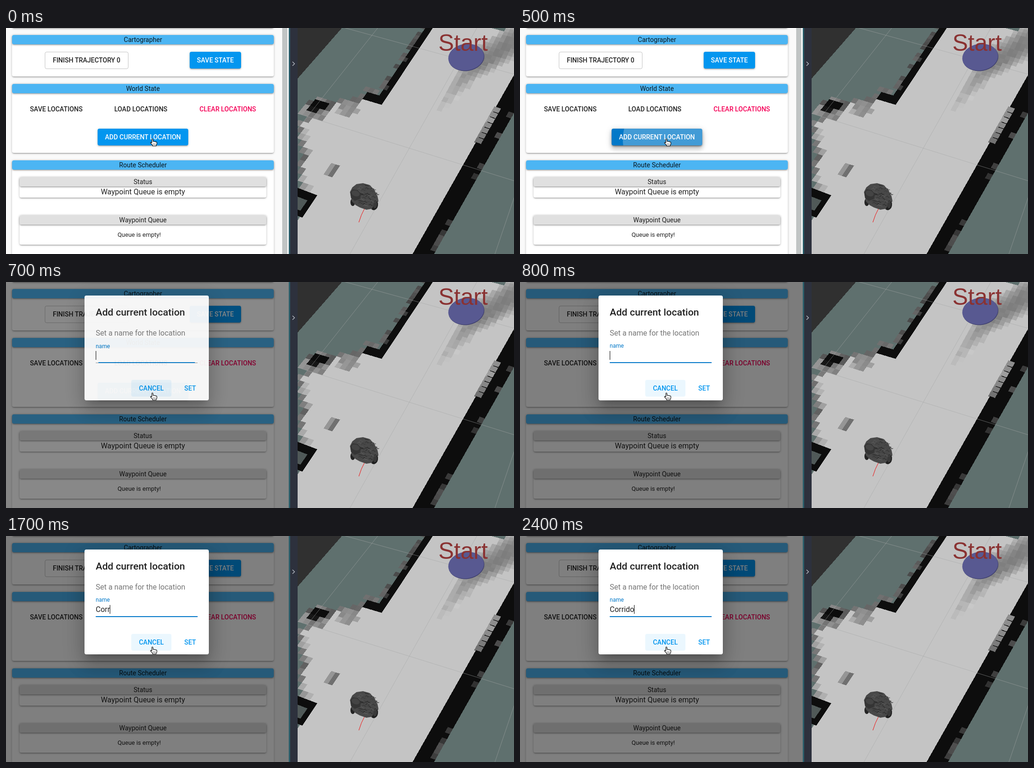
An HTML page that plays this animation: 1087x485 px, repeating every 2.6 s.

```html
<!DOCTYPE html>
<html lang="en">
<head>
<meta charset="utf-8">
<title>Add current location</title>
<style>
html, body { margin: 0; width: 100%; height: 100%; overflow: hidden; background: #fafafa; }
#stage { position: relative; width: 1087px; height: 485px; overflow: hidden; font: 400 14px Roboto, sans-serif; color: rgba(0,0,0,.87); }
#stage div, #stage svg { position: absolute; box-sizing: border-box; white-space: pre; }
.mid { text-align: center; }
.card { background: #fff; border-radius: 4px; box-shadow: 0 1px 5px rgba(0,0,0,.2), 0 2px 2px rgba(0,0,0,.14), 0 3px 1px -2px rgba(0,0,0,.12); }
.head { background: #4cb5f3; }
.sub { background: #e0e0e0; }
.btn { font-weight: 500; border-radius: 4px; }
.line { border: 1px solid rgba(0,0,0,.23); }
.blue { background: #0396ef; color: #fff; box-shadow: 0 1px 5px rgba(0,0,0,.2), 0 2px 2px rgba(0,0,0,.14), 0 3px 1px -2px rgba(0,0,0,.12); }
.red { color: #f50057; }
.link { color: #0396ef; }
.big { font-size: 16px; }
.small { font-size: 13px; }
#raise { border-radius: 4px; box-shadow: 0 5px 5px -3px rgba(0,0,0,.2), 0 8px 10px 1px rgba(0,0,0,.14), 0 3px 14px 2px rgba(0,0,0,.12); }
#add { overflow: hidden; }
#dialog { left: 168px; top: 29px; width: 266px; height: 225px; background: #fff; border-radius: 4px;
  box-shadow: 0 11px 15px -7px rgba(0,0,0,.2), 0 24px 38px 3px rgba(0,0,0,.14), 0 9px 46px 8px rgba(0,0,0,.12); }
#label { left: 24px; top: 99px; line-height: 18px; font-size: 16px; color: #0278c8; transform-origin: 0 0; }
#field { left: 24px; top: 119px; height: 19px; line-height: 19px; font-size: 16px; }
#caret { display: inline-block; width: 1px; height: 19px; background: #000; vertical-align: top; }
</style>
</head>
<body>
<div id="stage">
  <div id="page" style="left:0;top:0;width:605px;height:485px;background:#fafafa;overflow:hidden"></div>
  <div id="scroll" style="left:591px;top:0;width:11px;height:485px;background:#c0c4c4"></div>
  <div id="shade" style="left:0;top:0;width:605px;height:485px;background:#000"></div>
  <svg id="view" width="482" height="485" viewBox="605 0 482 485" style="left:605px;top:0"></svg>
  <div id="dialog">
    <div style="left:24px;top:22px;line-height:28px;font-size:21px;font-weight:500">Add current location</div>
    <div style="left:24px;top:70px;line-height:21px;font-size:16px;color:rgba(0,0,0,.54)">Set a name for the location</div>
    <div id="label">name</div>
    <div id="field"><span id="typed"></span><span id="caret"></span></div>
    <div style="left:24px;top:144px;width:218px;height:1px;background:rgba(0,0,0,.42)"></div>
    <div id="rule" style="left:24px;top:143px;width:218px;height:2px;background:#0278c8"></div>
    <div id="cancel" class="btn link mid" style="left:100px;top:181px;width:86px;height:36px;line-height:36px">CANCEL</div>
    <div class="btn link mid" style="left:194px;top:181px;width:64px;height:36px;line-height:36px">SET</div>
  </div>
  <svg width="18" height="18" viewBox="0 0 18 18" style="left:308px;top:237px">
    <path d="M4 10V2.5Q4 1 5.2 1T6.5 2.5V6.2Q7.9 5.5 9.2 6.7Q10.6 6 11.7 7.3Q14.8 6.8 14.8 9.4V12L13.4 14.4V16H5.5V14.4L1.6 10.4Q.6 8.8 2 8.3Q3.1 8.2 4 10Z" fill="#fff" stroke="#000" stroke-width="1.1"/>
    <path d="M7 11v2.5M9.2 11v2.5M11.4 11v2.5" stroke="#000" stroke-width=".7" fill="none"/>
  </svg>
</div>
<script>
const $ = id => document.getElementById(id);

// Panel: x, y, width, height, classes, text, id
const panel = [
  [13, -30, 560, 30, 'card'],
  [13, 15, 560, 89, 'card'],
  [13, 15, 560, 20, 'card head mid', 'Cartographer'],
  [83, 51, 179, 37, 'btn line mid', 'FINISH TRAJECTORY 0'],
  [393, 51, 110, 36, 'btn blue mid', 'SAVE STATE'],
  [13, 120, 560, 148, 'card'],
  [13, 120, 560, 20, 'card head mid', 'World State'],
  [37, 156, 141, 36, 'btn mid', 'SAVE LOCATIONS'],
  [218, 156, 141, 36, 'btn mid', 'LOAD LOCATIONS'],
  [404, 156, 141, 36, 'btn red mid', 'CLEAR LOCATIONS'],
  [196, 216, 194, 36, '', '', 'raise'],
  [196, 216, 194, 36, 'btn blue mid', '', 'add'],
  [13, 284, 560, 230, 'card'],
  [13, 284, 560, 20, 'card head mid', 'Route Scheduler'],
  [29, 320, 528, 44, 'card'],
  [29, 320, 528, 20, 'card sub mid', 'Status'],
  [29, 341, 528, 21, 'big mid', 'Waypoint Queue is empty'],
  [29, 402, 528, 63, 'card'],
  [29, 402, 528, 20, 'card sub mid', 'Waypoint Queue'],
  [21, 434, 528, 19, 'small mid', 'Queue is empty!']
];
$('page').innerHTML = panel.map(([x, y, w, h, cls, text = '', id = '']) =>
  `<div ${id && `id="${id}"`} class="${cls}" style="left:${x}px;top:${y}px;width:${w}px;height:${h}px;line-height:${cls.includes('line') ? h - 3 : h}px">${text}</div>`).join('');
$('add').innerHTML = '<div id="ripple" style="background:#fff;border-radius:50%"></div><div class="mid" style="left:0;top:0;width:194px">ADD CURRENT LOCATION</div>';

// Map view: floor cells seen in perspective, 20 cells per grid square
let seed = 11;
const rnd = () => (seed = seed * 16807 % 2147483647) / 2147483647;
const project = (a, b) => {
  const u = a / 20, v = b / 20, w = 1 - .0309 * u - .1574 * v;
  return [(157 * u - 239.5 * v + 783) / w, (49.3 * u + 144.5 * v + 15.6) / w].map(n => n.toFixed(1)).join();
};
const grey = n => `rgb(${n | 0},${n | 0},${n | 0})`;
const parts = [];
const poly = (points, fill) => parts.push(`<polygon points="${points}" fill="${fill}"/>`);
const quad = (a0, b0, a1, b1, fill) =>
  poly([project(a0, b0), project(a1, b0), project(a1, b1), project(a0, b1)].join(' '), fill);
const cell = (a, b, n) => quad(a, b, a + 1, b + 1, grey(n));
const wallAt = b => Math.round(32.3 - .113 * b);
const leftAt = b => b < 14 ? 11 : b < 16 ? 49 - 3 * b : b < 18 ? 2 : b < 21 ? 1
  : b < 31 ? Math.round(.3 + (b - 21) * .85) : b < 35 ? 10 : 0;

// One slanted piece of the right wall, dx to the right of its inner edge
function brick(dx, w, y, h, n) {
  const x = 870 + .565 * (485 - y) + dx, s = .565 * h, drop = .3 * w;
  poly(`${x},${y} ${x + w - .565 * drop},${y + drop} ${x + w - .565 * drop - s},${y + drop + h} ${x - s},${y + h}`, grey(n));
}

function drawMap() {
  quad(-7, -30, 60, 60, '#5f706e');
  for (let b = -10; b < 48; b++) quad(leftAt(b), b, wallAt(b) + 1, b + 1.03, '#c4c4c4');

  // upper wall and its foot
  quad(9.5, -10, 11, 14, '#0e0e0e');
  quad(7, 12.4, 11, 14, '#0e0e0e');
  for (let b = -10; b < 12; b++) {
    if (rnd() < .75) quad(8.5, b, 9.5, b + 1, grey(70 + rnd() * 35));
    if (rnd() < .2) quad(9.5, b, 10.2, b + 1, grey(35 + rnd() * 35));
  }
  for (let a = 6; a < 9; a++) cell(a, 11.4, 85 + rnd() * 40);
  cell(6, 13, 110);

  // left outline
  for (let a = 3; a < 7; a++) {
    cell(a, 15, 95 + rnd() * 50);
    if (a > 4) cell(a, 14, 85 + rnd() * 40);
  }
  for (let a = 4; a < 8; a++) for (let b = 16; b < 18; b++)
    if (rnd() < .7) cell(a, b, 135 + rnd() * 45);
  for (let a = -2; a < 3; a++) for (let b = 16; b < 20; b++)
    if (a + b > 14) cell(a, b, 80 + rnd() * 70);
  quad(-1, 16.6, 2, 18, '#0c0c0c');
  quad(-1, 18, 1, 19, '#161616');
  for (let b = 19; b < 31; b++) {
    cell(leftAt(b) - 1, b, 95 + rnd() * 75);
    if (rnd() < .4) cell(leftAt(b), b, 160 + rnd() * 25);
  }
  quad(9.2, 26, 10, 28, grey(150));
  quad(10, 26, 10.8, 28, grey(112));

  // lower left wall
  poly('624,343 666,359 634,407 624,403', '#0d0d0d');
  poly('624,362 645,370 630,392 624,390', '#505958');

  // scanned shadow beyond the marker
  for (let b = -12; b < 12; b++) {
    const from = b < -3 ? 21 - (b + 3) * .6 : 20.5, to = b > 3 ? 24.7 - (b - 3.6) * .38 : 25 - (b - 3) * .75;
    for (let a = Math.round(from); a < to; a++) {
      const edge = Math.min(a - from + .6, to - a);
      cell(a, b, 190 - Math.min(edge, 3) * 17 - rnd() * 14 + Math.max(0, b) * 1.6);
    }
  }

  // right wall
  for (let y = 80; y < 490; y += 11) {
    const open = y > 165 && y < 235;
    brick(0, 46, y, 11.3, 13);
    if (open) brick(-4, 17, y, 11.3, 110 + rnd() * 50);
    if (rnd() < .4) brick(33, 13, y, 11.3, 45 + rnd() * 40);
  }

  const grid = (a0, b0, a1, b1) => `M${project(a0, b0)}L${project(a1, b1)}`;
  let d = '';
  for (let n = -20; n <= 60; n += 20) d += grid(n, -30, n, 55) + grid(-7, n, 60, n);
  return `<g shape-rendering="crispEdges">${parts.join('')}</g><path d="${d}" stroke="#a4a6a6" stroke-opacity=".55" fill="none"/>`;
}

function drawRobot() {
  let s = `<path d="M767 388Q760 400 755 417" stroke="#f01010" fill="none"/>
    <ellipse cx="742" cy="374" rx="5" ry="8" fill="#242424"/>
    <ellipse cx="788" cy="380" rx="8" ry="11" fill="#1f1f1f" transform="rotate(12 788 380)"/>
    <path d="M736 352L741 342L750 335L764 333L778 337L788 347L795 361L797 371L788 378L783 388L771 390L757 385L748 380L740 372Z" fill="#484848"/>`;
  for (let i = 0; i < 60; i++) {
    const t = rnd() * 6.283, r = Math.sqrt(rnd());
    const x = 767 + 24 * r * Math.cos(t), y = 361 + 23 * r * Math.sin(t);
    s += `<path d="M${x.toFixed(1)} ${y.toFixed(1)}l4 -2l2 3l3 -1" stroke="${grey(38 + rnd() * 54)}" stroke-width="1.3" fill="none"/>`;
  }
  return s + `<path d="M737 353L742 346L753 348L760 357L757 367L746 371L738 364Z" fill="#353535"/>
    <ellipse cx="748" cy="355" rx="9" ry="6" fill="#444" transform="rotate(20 748 355)"/>
    <ellipse cx="790" cy="380" rx="4" ry="7" fill="#393939" transform="rotate(12 790 380)"/>`;
}

$('view').innerHTML = `<path d="M605 0h482v485H605z" fill="#303030"/>${drawMap()}
  <ellipse cx="985.2" cy="63.5" rx="38.5" ry="28.8" fill="#3d3e6c" transform="rotate(-9 985 63)"/>
  <ellipse cx="984.5" cy="62.5" rx="38.3" ry="28.5" fill="#585991" transform="rotate(-9 984.5 62.5)"/>
  <text x="978" y="49" font-family="'Liberation Sans', Arial, sans-serif" font-size="50" text-anchor="middle" fill="#8a3232">Start</text>
  ${drawRobot()}
  <path d="M605 0h3v485h-3z" fill="#2b5f6b"/><path d="M608 0h16v485h-16z" fill="#2d313d"/>
  <path d="M613 72.5l4.5 4.2l-4.5 4.2" stroke="#bcc0c8" stroke-width="1.3" fill="none"/>`;

// Motion
const clamp = x => Math.min(1, Math.max(0, x));
function bezier(x1, y1, x2, y2) {
  const at = (p, q, s) => 3 * p * s * (1 - s) ** 2 + 3 * q * s * s * (1 - s) + s ** 3;
  return x => {
    x = clamp(x);
    if (x === 0 || x === 1) return x;
    let lo = 0, hi = 1;
    for (let i = 0; i < 24; i++) {
      const m = (lo + hi) / 2;
      if (at(x1, x2, m) < x) lo = m; else hi = m;
    }
    return at(y1, y2, lo);
  };
}
const ease = bezier(.4, 0, .2, 1), easeOut = bezier(0, 0, .2, 1);
const mix = (p, q, k) => p + (q - p) * k;
const word = 'Corrido', keys = [1100, 1300, 1600, 1700, 2000, 2300, 2400];

function update(now) {
  const t = Math.floor(now % 2600 / 100) * 100;

  const hover = ease((t - 150) / 250);
  $('add').style.backgroundColor = `rgb(${mix(3, 2, hover)},${mix(150, 120, hover)},${mix(239, 200, hover)})`;
  $('raise').style.opacity = ease((t - 225) / 280) - ease((t - 560) / 240);

  const wave = ease((t - 225) / 550), r = 120 * wave, ripple = $('ripple').style;
  ripple.left = 117 - r + 'px';
  ripple.top = 23 - r + 'px';
  ripple.width = ripple.height = 2 * r + 'px';
  ripple.opacity = mix(.1, .3, wave);

  const fade = ease((t - 546) / 225);
  $('shade').style.opacity = fade / 2;
  $('dialog').style.opacity = fade;
  $('scroll').style.display = t < 600 ? 'block' : 'none';

  const focus = easeOut((t - 560) / 200);
  $('label').style.transform = `translateY(${mix(20, 2.2, focus)}px) scale(${mix(1, .75, focus)})`;
  $('rule').style.transform = `scaleX(${focus})`;
  $('cancel').style.background = `rgba(3,150,239,${.08 * ease((t - 600) / 120)})`;
  $('typed').textContent = word.slice(0, keys.filter(k => t >= k).length);
}

const start = performance.now();
function tick() {
  update(performance.now() - start);
  requestAnimationFrame(tick);
}
tick();
</script>
</body>
</html>
```
